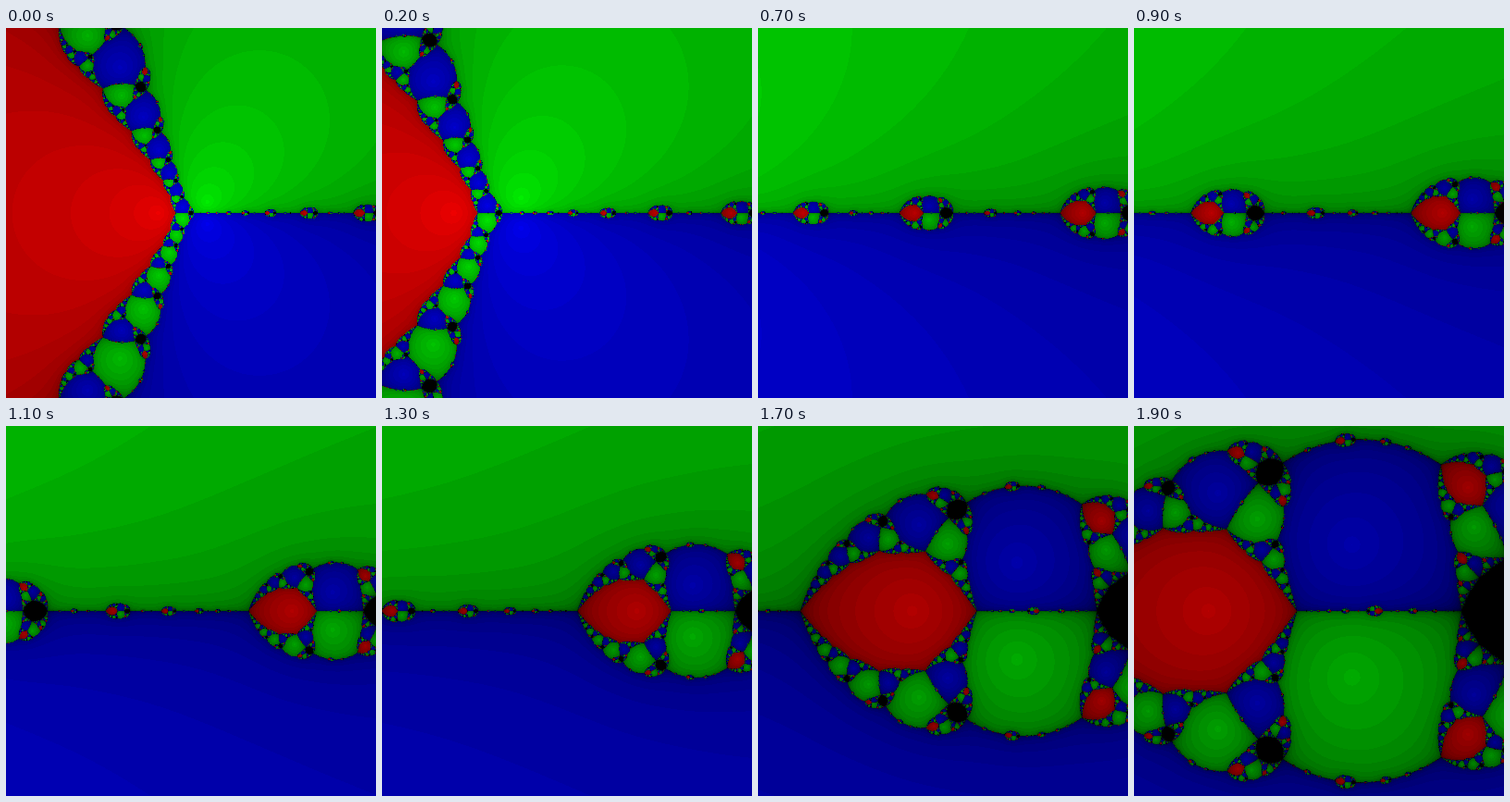
An HTML page with a canvas that plays this animation: 400 by 400 pixels, repeating every 2000 ms.

```html
<!DOCTYPE html>
<html lang="en">
<head>
<meta charset="utf-8">
<title>Newton fractal zoom</title>
<style>
  html, body { margin: 0; width: 100%; height: 100%; overflow: hidden; background: #000; }
  canvas { display: block; width: 100vw; height: 100vh; }
</style>
</head>
<body>
<canvas id="stage" width="400" height="400"></canvas>
<script>
const SIZE = 400, STEPS = 20, STEP_MS = 100;
const MAX_ITERATIONS = 30, TOLERANCE = 0.01;
const START_WIDTH = 20, END_WIDTH = 1, RIGHT_EDGE = 10;

// Roots of z^3 - 2z + 2 as [re, im], in the order of the colour channels.
const ROOTS = [
  [-1.7692923542386314, 0],
  [0.8846461771193157, 0.5897428050222055],
  [0.8846461771193157, -0.5897428050222055],
];

const ctx = document.getElementById('stage').getContext('2d');
const cache = [];

// Writes the pixel colour for the start point x + iy; black if Newton's method does not settle.
function shade(data, offset, x, y) {
  for (let n = 1; n < MAX_ITERATIONS; n++) {
    for (let k = 0; k < 3; k++) {
      const dx = x - ROOTS[k][0], dy = y - ROOTS[k][1];
      if (dx * dx + dy * dy < TOLERANCE * TOLERANCE) {
        data[offset + k] = Math.floor(255 * (1 - n / MAX_ITERATIONS));
        return;
      }
    }
    // z -> (2z^3 - 2) / (3z^2 - 2)
    const sx = x * x - y * y, sy = 2 * x * y;
    const nx = 2 * (sx * x - sy * y) - 2, ny = 2 * (sx * y + sy * x);
    const dx = 3 * sx - 2, dy = 3 * sy;
    const norm = dx * dx + dy * dy;
    x = (nx * dx + ny * dy) / norm;
    y = (ny * dx - nx * dy) / norm;
  }
}

// The view shrinks geometrically while its right edge stays fixed.
function render(step) {
  const width = START_WIDTH * (END_WIDTH / START_WIDTH) ** (step / (STEPS - 1));
  const image = ctx.createImageData(SIZE, SIZE);
  for (let row = 0, offset = 0; row < SIZE; row++) {
    const y = width * (0.5 - row / (SIZE - 1));
    for (let col = 0; col < SIZE; col++, offset += 4) {
      image.data[offset + 3] = 255;
      shade(image.data, offset, RIGHT_EDGE + width * (col / (SIZE - 1) - 1), y);
    }
  }
  return image;
}

let shown = -1;
function draw() {
  const step = Math.floor(performance.now() / STEP_MS) % STEPS;
  if (step !== shown) {
    cache[step] ??= render(step);
    ctx.putImageData(cache[step], 0, 0);
    shown = step;
  }
  requestAnimationFrame(draw);
}
draw();
</script>
</body>
</html>
```
